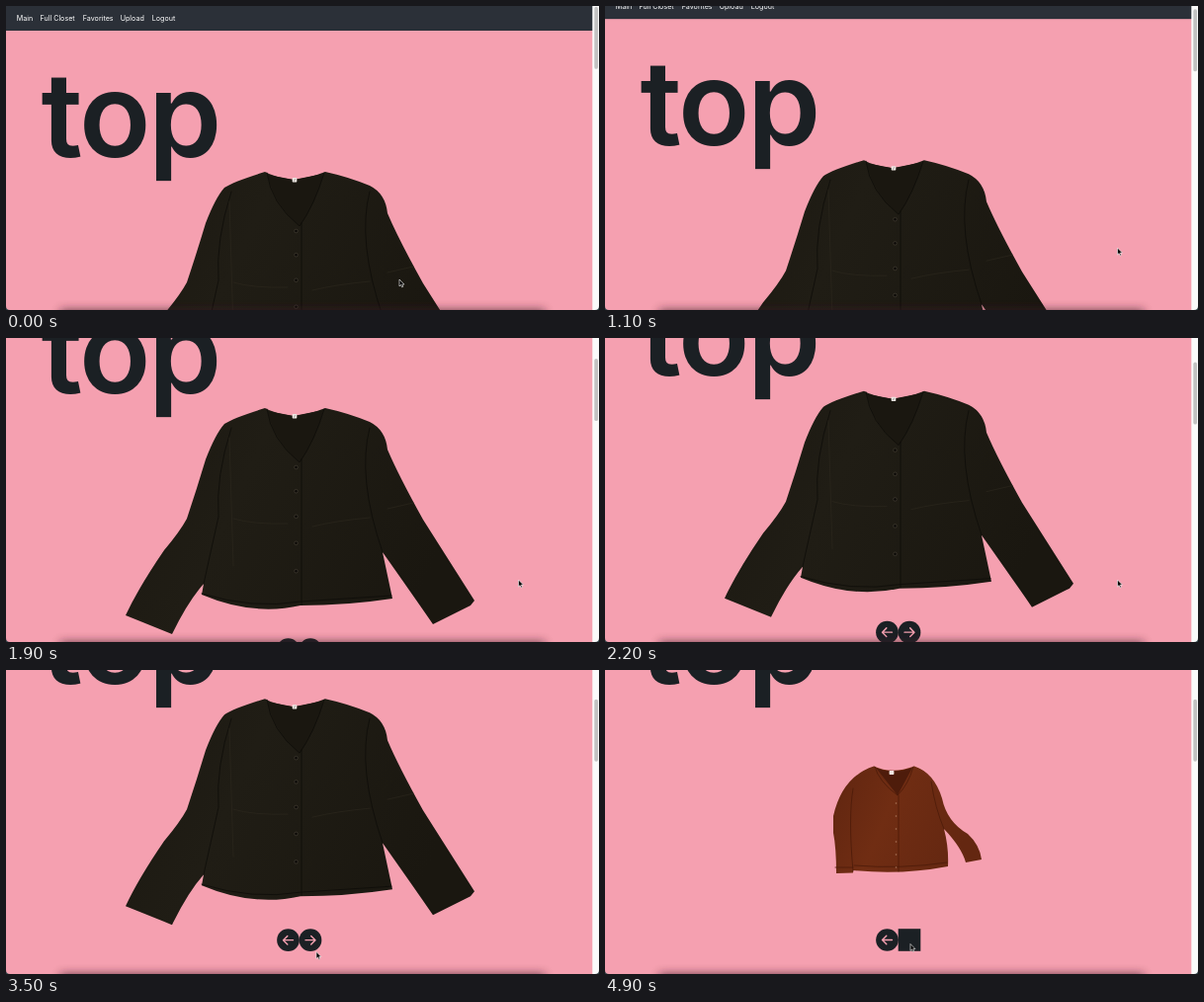
Recreate the animation shown at these times as an HTML page. Size 600 px wide and 308 px high, loop 5 s.

```html
<!DOCTYPE html>
<html lang="en">
<head>
<meta charset="utf-8">
<title>Closet</title>
<style>
  html, body { margin: 0; width: 100%; height: 100%; overflow: hidden; background: #f5a0b0; }
  svg { display: block; width: 600px; height: 308px; font-family: Inter, "Liberation Sans", sans-serif; }
  .nav { font-size: 7.15px; fill: #fff; }
  .title { font-size: 119px; font-weight: 580; letter-spacing: -.02em; }
  .ink { fill: #1b2024; }
  .seam, .arrow { fill: none; stroke-linecap: round; stroke-linejoin: round; }
  .arrow { stroke: #f5a0b0; }
</style>
</head>
<body>
<svg viewBox="0 0 600 308">
  <defs>
    <linearGradient id="black" x2="1" y2=".3">
      <stop offset="0" stop-color="#1b1811"/>
      <stop offset=".4" stop-color="#201d15"/>
      <stop offset="1" stop-color="#1a1710"/>
    </linearGradient>
    <linearGradient id="brown" x2="1" y2=".3">
      <stop offset="0" stop-color="#602510"/>
      <stop offset=".45" stop-color="#702d13"/>
      <stop offset="1" stop-color="#642711"/>
    </linearGradient>
    <filter id="soft" x="-10%" y="-200%" width="120%" height="500%">
      <feGaussianBlur stdDeviation="5"/>
    </filter>
    <circle id="disc" class="ink" r="8"/>
    <path id="arrow" class="arrow" d="M-3.5 0H3.5M.5-3L3.5 0 .5 3"/>
  </defs>

  <rect width="600" height="308" fill="#f5a0b0"/>

  <g id="page">
    <rect width="594" height="25" fill="#2b3038"/>
    <g class="nav">
      <text x="10.7" y="15">Main</text>
      <text x="34.5" y="15">Full Closet</text>
      <text x="77.8" y="15">Favorites</text>
      <text x="115.7" y="15">Upload</text>
      <text x="147.8" y="15">Logout</text>
    </g>
    <text class="title ink" x="35.5" y="152.7">top</text>

    <g id="blouse" transform="translate(0 128)">
      <path fill="url(#black)" d="M262 40Q270 45 291 48Q308 46 323 40Q346 45 368 54Q384 62 386 82
        Q397 108 422 153L474 235 470 240 432 259Q412 230 381 186L391 233Q345 240 298 240
        Q250 251 198 229L200 218Q184 236 168 269L121 250Q134 222 160 184Q176 165 183 152
        Q193 122 202 92Q212 66 221 56Q230 50 262 40Z"/>
      <path fill="#1a1710" d="M265 43L291 48 321 42Q312 75 297 95Q271 73 265 43Z"/>
      <g class="seam" stroke="#0f0d09" stroke-width=".8">
        <path d="M264 41Q268 72 297 95Q312 74 322 41M299 92V239M228 60Q212 110 215 150L200 218"/>
        <path d="M368 60Q355 110 381 186M198 228Q250 244 298 236L390 230"/>
      </g>
      <path class="seam" stroke="#2c281e" stroke-width=".7"
        d="M230 152Q250 158 285 157M310 160Q335 154 368 151M226 70L230 200M386 142L412 136"/>
      <g id="studs" fill="#0c0a07" stroke="#454035" stroke-width=".7"></g>
      <rect x="289.7" y="46" width="4.6" height="4.4" rx=".7" fill="#eee8e3"/>
      <path d="M291.5 49.5l1-2.3" stroke="#777" stroke-width=".7"/>
    </g>

    <g id="cardigan" transform="translate(0 139)">
      <path fill="url(#brown)" d="M272 97.5Q290 106 313 97.5Q333 104 341 130Q346 154 367 166
        Q379 177 381 192L365 195Q361 180 343 161Q348 180 347 199Q300 208 251 203V205.5L234 206
        Q234 180 231 165V148Q240 108 272 97.5Z"/>
      <path fill="#4e1c0b" d="M274 99Q290 106 311 99L296 127Z"/>
      <g class="seam" stroke="#4c1b0a" stroke-width=".8">
        <path d="M273 98Q277 113 296 127Q307 116 312 98M297 127V204M251 120Q246 150 251 204"/>
        <path d="M330 113Q334 140 343 161M252 198Q300 202 346 195M233 200H251"/>
      </g>
      <g id="dots" fill="#a8735a"></g>
      <rect x="287.6" y="102" width="4.8" height="4" rx=".7" fill="#f1e6e2"/>
    </g>

    <g transform="translate(285.5 412.5) scale(-1.42 1.42)">
      <use href="#disc"/><use href="#arrow"/>
    </g>
    <g id="next" transform="translate(308 412.5) scale(1.42)">
      <use href="#disc"/><use href="#arrow"/>
    </g>
    <rect id="pressed" class="ink" x="296.7" y="401.2" width="22.6" height="22.6"/>
  </g>

  <rect x="55" y="308" width="490" height="20" fill="#3a1f28" opacity=".75" filter="url(#soft)"/>
  <rect x="593.3" width="6.7" height="308" fill="#fafafa"/>
  <rect id="thumb" x="595.3" y=".8" width="3.7" height="63" rx="1.85" fill="#c1c1c1"/>
  <path d="M0 304Q0 308 4 308H0ZM600 304Q600 308 596 308H600Z" fill="#2f4247"/>

  <g id="cursor">
    <path transform="scale(.85)" d="M0 0V8.2L1.9 6.5 3.1 9.3 4.5 8.7 3.3 6H5.8Z"
      stroke="#fff" stroke-width=".7" stroke-linejoin="round"/>
  </g>
</svg>

<script>
  const LOOP = 5000, STEP = 100, CLICK = 4100;
  const $ = id => document.getElementById(id);

  // Wheel scroll: quick start, long run-out, stopped at the end position.
  function scrollAt(t) {
    const u = Math.max(0, t - 980) / 816;
    return Math.min(139, 141 * (1 - Math.exp(-(u ** 1.27))));
  }

  // Pointer moves: start, end, dx, dy.
  const moves = [
    [0, 100, 44, -9],
    [200, 500, 76.5, -23],
    [2800, 3400, -204.5, 40.5],
    [3600, 3800, -5, -8]
  ];

  function easeOut(t, from, to) {
    const u = Math.min(1, Math.max(0, (t - from) / (to - from)));
    return 1 - (1 - u) ** 2;
  }

  function pointerAt(t) {
    let x = 398, y = 277;
    for (const [from, to, dx, dy] of moves) {
      const k = easeOut(t, from, to);
      x += dx * k;
      y += dy * k;
    }
    return [x, y];
  }

  function addButtons(id, count, x, r, yAt) {
    for (let i = 0; i < count; i++) {
      $(id).insertAdjacentHTML("beforeend", `<circle cx="${x}" cy="${yAt(i)}" r="${r}"/>`);
    }
  }
  addButtons("studs", 5, 293.5, 1.8, i => 100 + 23.5 * i + 0.7 * i * i);
  addButtons("dots", 6, 294.5, 0.8, i => 135 + 13 * i);

  const show = (id, on) => $(id).setAttribute("visibility", on ? "visible" : "hidden");
  const move = (id, x, y) => $(id).setAttribute("transform", `translate(${x} ${y})`);

  function draw(now) {
    const t = Math.floor(now % LOOP / STEP) * STEP;
    const scroll = scrollAt(t), clicked = t >= CLICK;
    move("page", 0, -scroll);
    move("thumb", 0, scroll * 0.208);
    move("cursor", ...pointerAt(t));
    show("blouse", !clicked);
    show("next", !clicked);
    show("cardigan", clicked);
    show("pressed", clicked);
  }

  const start = performance.now();
  function tick() {
    draw(performance.now() - start);
    requestAnimationFrame(tick);
  }
  tick();
</script>
</body>
</html>
```
